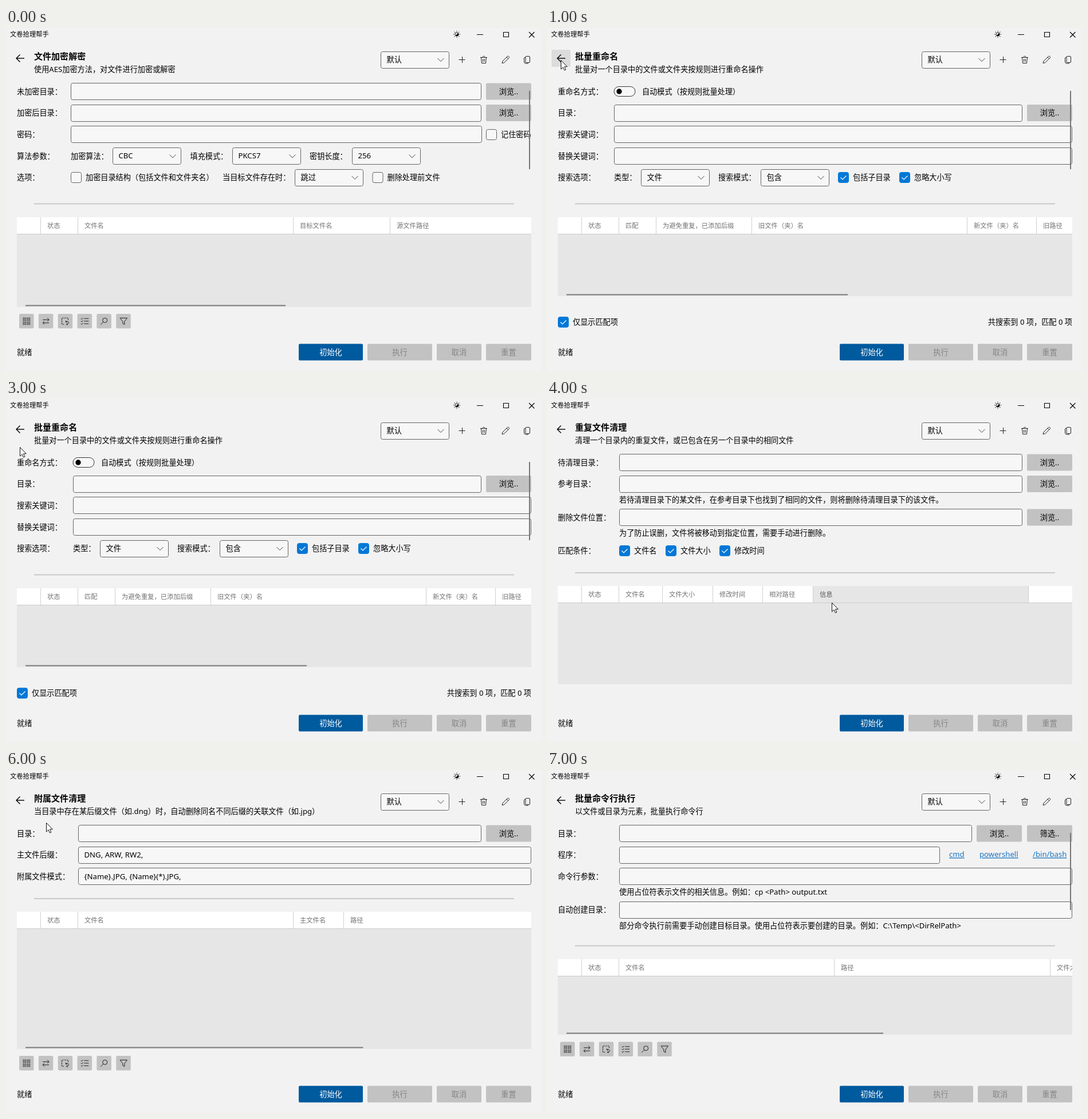
Animation, 934 px wide and 600 px high, one loop 8 s. Source, as an HTML page:

```html
<!DOCTYPE html>
<html lang="zh-CN">
<head>
<meta charset="utf-8">
<style>
html, body { margin: 0; width: 100%; height: 100%; overflow: hidden; background: #f2f2f2; }
svg { display: block; }
text { font-family: "Noto Sans", "Noto Sans CJK SC", "Noto Sans CJK", sans-serif; white-space: pre; }
</style>
</head>
<body>
<svg id="stage" width="934" height="600" viewBox="0 0 934 600"></svg>
<script>
const BODY = 13.16, SMALL = 11.3;
const ROW = [111, 148.5, 186, 224, 261.5];

// y is the vertical middle of the glyphs
const text = (x, y, s, o = {}) => {
  const { size = BODY, fill = '#000', anchor = 'start', extra = '' } = o;
  const safe = s.replace(/&/g, '&amp;').replace(/</g, '&lt;');
  return `<text x="${x}" y="${y + size * 0.36}" font-size="${size}" fill="${fill}" text-anchor="${anchor}" ${extra}>${safe}</text>`;
};
const rect = (x, y, w, h, fill, r = 0, stroke = 'none') =>
  `<rect x="${x}" y="${y}" width="${w}" height="${h}" rx="${r}" fill="${fill}" stroke="${stroke}"/>`;
const path = (d, w = 1, stroke = '#222', extra = '') =>
  `<path d="${d}" fill="none" stroke="${stroke}" stroke-width="${w}" ${extra}/>`;
const at = (x, y, s) => `<g transform="translate(${x} ${y})">${s}</g>`;

const label = (y, s) => text(19, y, s);
const frame = (x, y, w) => rect(x + .5, Math.round(y - 15) + .5, w - 1, 29, '#f7f7f7', 3, '#646464');
const field = (x, y, right, s = '') => frame(x, y, right - x) + text(x + 10.5, y, s);
const combo = (x, y, s) => frame(x, y, 120) + text(x + 10.5, y - .5, s) +
  path(`M${x + 99.5} ${y - 2.5}l5.5 5.5 5.5 -5.5`, 1, '#444');
const button = (x, y, w, s, fill = '#c2c2c2', ink = '#000', extra = '') =>
  rect(x, y - 14.5, w, 29, fill, 2) + text(x + w / 2, y, s, { fill: ink, anchor: 'middle', extra });
const browse = y => button(838, y, 79, '浏览..');
const check = (x, y, s, on) =>
  rect(x + .5, Math.round(y - 9.5) + .5, 18, 18, on ? '#0078d7' : '#f7f7f7', 3, on ? '#0078d7' : '#646464') +
  (on ? path(`M${x + 4.5} ${y}l3.5 3.5 6.5 -6.5`, 1.2, '#fff') : '') + text(x + 26, y, s);
const heading = (title, note) =>
  text(49, 50, title, { size: 15.04, extra: 'font-weight="700"' }) + text(49, 72.5, note);
const divider = y => rect(49, y, 838, 2, '#c9c9c9');
const scrollY = bottom => rect(913, 110, 2, bottom - 110, '#767676');
const scrollX = (y, right) => rect(34, y, right - 34, 2, '#7b7b7b');

// cols: [left edge, caption]; hot is the index of a hovered column
const table = (y, bottom, cols, hot = -1) => {
  let s = rect(19, y, 898, bottom - y, '#e6e6e6') + rect(19, y, 898, 29, '#fff');
  cols.forEach(([x, name], i) => {
    if (i === hot) s += rect(x, y, cols[i + 1][0] - x, 29, '#e6e6e6');
    if (x > 19) s += rect(x, y, 1, 29, '#cfcfcf');
    s += text(x + 12, y + 15, name, { size: SMALL, fill: i === hot ? '#555' : '#727272' });
  });
  return s + rect(19, y + 29, 898, 1, '#cbcbcb');
};

const cells = () => {
  let s = '';
  for (let i = 0; i < 16; i++) {
    const x = -6 + (i % 4) * 3.2 + (i % 4 > 1 ? .6 : 0), y = -6 + (i >> 2) * 3.2 + (i > 7 ? .6 : 0);
    s += rect(x, y, 2, 2, 'none', .4, '#222');
  }
  return `<g stroke-width=".7">${s}</g>`;
};
const glyphs = [
  cells(),
  path('M-5.5 -2.5H5.5M2.5 -5.5L5.5 -2.5 2.5 .5M5.5 3H-5.5M-2.5 0L-5.5 3 -2.5 6'),
  path('M5 -2V-5.5H-6V5.5H-1', 1.1, '#222', 'stroke-dasharray="2.4 1.4"') +
    path('M1 1.5C4 -1 7 1.5 5.5 4 4.5 5.5 3 5.5 2 5.5M4 3.5L2 5.5 4 7M1 -1V1.5H3.5'),
  path('M-1 -4.5H7M-1 0H7M-1 4.5H7M-6.5 -4.5l1.3 1.3 2.4 -2.6M-6.5 0l1.3 1.3 2.4 -2.6M-6.5 4.5l1.3 1.3 2.4 -2.6'),
  '<circle cx="1.5" cy="-1.5" r="4" fill="none" stroke="#222"/>' + path('M-1.5 1.5L-6 6'),
  path('M-6 -5.5H6.5L1.8 .5V6L-1.3 4V.5Z', 1, '#222', 'stroke-linejoin="round"')
];
const toolbar = y => glyphs.map((g, i) =>
  rect(23 + i * 33.85, y - 12.5, 25.5, 25.5, '#c2c2c2', 2) + at(35.8 + i * 33.85, y + .3, g)).join('');

const sun = () => {
  let s = '<circle r="3.2" fill="none" stroke="#111"/><path d="M2.3 -2.3A3.2 3.2 0 0 1 -2.3 2.3Z" fill="#111"/>';
  for (let a = 0; a < 360; a += 45) s += `<path d="M0 -6.2V-4.8" stroke="#111" transform="rotate(${a})"/>`;
  return s;
};
const off = ['#c2c2c2', '#858585'];
const chrome =
  text(7, 11, '文卷拾理帮手', { size: SMALL }) + at(787, 11, sun()) +
  path('M822 11.5H833M868.5 7.5H877.5V15.5H868.5ZM913 7L922.5 16.5M922.5 7L913 16.5', 1.1, '#000') +
  path('M32 53H18M24.5 46.5L18 53 24.5 59.5', 1.5, '#111') +
  combo(654, 55.5, '默认') +
  path('M790.5 55.5H801.5M796.5 50V61', 1, '#222') +
  path('M828 51.5H840M829.5 51.5L830.5 61.5H837.5L838.5 51.5M832 51.5C832 48.5 836 48.5 836 51.5M832.7 54V59M835.3 54V59', 1, '#222') +
  path('M866 61.5L867 58 875.5 49.5C877.5 48.5 879.5 50.5 878 52.5L869.5 60.8ZM874 51L876.7 53.7', 1, '#222') +
  path('M907.5 49.5H913Q914.5 49.5 914.5 51V59Q914.5 60.5 913 60.5H908.5Q907 60.5 907 59V50M907 51Q904.5 51 904.5 53V59Q904.5 62 908 62H912', 1, '#222') +
  label(567, '就绪') +
  button(511, 567, 112, '初始化', '#005a9e', '#fff', 'font-weight="500"') +
  button(631, 567, 113, '执行', ...off) + button(752, 567, 78, '取消', ...off) + button(838, 567, 79, '重置', ...off);

const crypt =
  heading('文件加密解密', '使用AES加密方法，对文件进行加密或解密') +
  label(ROW[0], '未加密目录：') + field(113, ROW[0], 830) + browse(ROW[0]) +
  label(ROW[1], '加密后目录：') + field(113, ROW[1], 830) + browse(ROW[1]) +
  label(ROW[2], '密码：') + field(113, ROW[2], 831) + check(838, ROW[2], '记住密码') +
  label(ROW[3], '算法参数：') + text(113, ROW[3], '加密算法：') + combo(186, ROW[3], 'CBC') +
  text(321.5, ROW[3], '填充模式：') + combo(395, ROW[3], 'PKCS7') +
  text(530, ROW[3], '密钥长度：') + combo(604, ROW[3], '256') +
  label(ROW[4], '选项：') + check(113, ROW[4], '加密目录结构（包括文件和文件夹名）') +
  text(378, ROW[4], '当目标文件存在时：') + combo(504, ROW[4], '跳过') + check(639.5, ROW[4], '删除处理前文件') +
  scrollY(247) + divider(306.5) +
  table(331, 488, [[60, '状态'], [125, '文件名'], [501, '目标文件名'], [670, '源文件路径']]) +
  scrollX(484.5, 488) + toolbar(512.5);

const clone =
  heading('目录结构克隆', '以一个目录为模板，导出一个新的稀疏文件目录，或包含文件结构的JSON文件') +
  label(ROW[0], '模板目录：') + field(152, ROW[0], 830) + browse(ROW[0]) +
  label(ROW[1], '稀疏文件目录导出：') + field(152, ROW[1], 830) + browse(ROW[1]) +
  text(152, 176, '生成一个新的目录，目录中文件与模板一致，但大小为0') +
  label(207, '结构文件导出：') + field(152, 207, 830) + browse(207) +
  text(152, 234.5, '导出为一个包含文件基本信息的JSON文件') + divider(265.5) +
  table(290, 507, [[19, '状态'], [83, '文件名'], [159, '文件大小'], [247, '修改时间'], [334, '信息'], [710, '']]);

const rename =
  heading('批量重命名', '批量对一个目录中的文件或文件夹按规则进行重命名操作') +
  label(ROW[0], '重命名方式：') + rect(117, 102.5, 37, 17, '#f7f7f7', 8.5, '#333') +
  '<circle cx="126" cy="111" r="4.7"/>' + text(166, ROW[0], '自动模式（按规则批量处理）') +
  label(ROW[1], '目录：') + field(117, ROW[1], 830) + browse(ROW[1]) +
  label(ROW[2], '搜索关键词：') + field(117, ROW[2], 917) +
  label(ROW[3], '替换关键词：') + field(117, ROW[3], 917) +
  label(ROW[4], '搜索选项：') + text(117, ROW[4], '类型：') + combo(164, ROW[4], '文件') +
  text(299, ROW[4], '搜索模式：') + combo(373, ROW[4], '包含') +
  check(508, ROW[4], '包括子目录', 1) + check(615, ROW[4], '忽略大小写', 1) +
  scrollY(247) + divider(306.5) +
  table(331, 469, [[60, '状态'], [125, '匹配'], [190, '为避免重复，已添加后缀'],
    [357, '旧文件（夹）名'], [733, '新文件（夹）名'], [854, '旧路径']]) +
  scrollX(465.5, 525) + check(19, 514.5, '仅显示匹配项', 1) +
  text(917, 514.5, '共搜索到 0 项，匹配 0 项', { anchor: 'end' });

const dedupe =
  heading('重复文件清理', '清理一个目录内的重复文件，或已包含在另一个目录中的相同文件') +
  label(ROW[0], '待清理目录：') + field(126, ROW[0], 830) + browse(ROW[0]) +
  label(ROW[1], '参考目录：') + field(126, ROW[1], 830) + browse(ROW[1]) +
  text(126, 176, '若待清理目录下的某文件，在参考目录下也找到了相同的文件，则将删除待清理目录下的该文件。') +
  label(207, '删除文件位置：') + field(126, 207, 830) + browse(207) +
  text(126, 234.5, '为了防止误删，文件将被移动到指定位置，需要手动进行删除。') +
  label(265.5, '匹配条件：') + check(126, 265.5, '文件名', 1) + check(207, 265.5, '文件大小', 1) +
  check(301, 265.5, '修改时间', 1) + divider(303) +
  table(327, 499, [[60, '状态'], [125, '文件名'], [201, '文件大小'], [289, '修改时间'],
    [376, '相对路径'], [464, '信息'], [840, '']], 5);

const attached =
  heading('附属文件清理', '当目录中存在某后缀文件（如.dng）时，自动删除同名不同后缀的关联文件（如.jpg）') +
  label(ROW[0], '目录：') + field(126, ROW[0], 830) + browse(ROW[0]) +
  label(ROW[1], '主文件后缀：') + field(126, ROW[1], 917, 'DNG, ARW, RW2,') +
  label(ROW[2], '附属文件模式：') + field(126, ROW[2], 917, '{Name}.JPG, {Name}(*).JPG,') + divider(224) +
  table(248, 488, [[60, '状态'], [125, '文件名'], [501, '主文件名'], [589, '路径']]);
const attachedFoot = scrollX(484.5, 623.5) + toolbar(512.5);

const link = (x, s) => text(x, 147.5, s, { fill: '#1a74c2', extra: 'text-decoration="underline"' });
const command =
  heading('批量命令行执行', '以文件或目录为元素，批量执行命令行') +
  label(ROW[0], '目录：') + field(126, ROW[0], 742) + button(750, ROW[0], 79, '浏览..') + button(838, ROW[0], 79, '筛选..') +
  label(ROW[1], '程序：') + field(126, ROW[1], 686) + link(702, 'cmd') + link(755, 'powershell') + link(848, '/bin/bash') +
  label(ROW[2], '命令行参数：') + field(126, ROW[2], 917) +
  text(126, 213.5, '使用占位符表示文件的相关信息。例如：cp <Path> output.txt') +
  label(244.5, '自动创建目录：') + field(126, 244.5, 917) +
  text(126, 272, '部分命令执行前需要手动创建目标目录。使用占位符表示要创建的目录。例如：C:\\Temp\\<DirRelPath>') +
  scrollY(245) + divider(306.5) +
  table(331, 463, [[60, '状态'], [125, '文件名'], [501, '路径'], [878, '文件大小']]) +
  scrollX(459.5, 587) + toolbar(488);

const pointer = (x, y) => at(x + .5, y + .5,
  '<path d="M0 0V15.5L3.6 12.2 6 17.5 8.4 16.5 6 11.2H10.8Z" fill="#fff" stroke="#111"/>');
const backHover = rect(8, 38, 33, 30, '#dcdcdc', 2);

// one scene per second: [under the window chrome, page, pointer]
const scenes = [
  ['', crypt, ''],
  [backHover, rename, pointer(24, 56)],
  ['', clone, pointer(101, 130)],
  ['', rename, pointer(24, 84)],
  ['', dedupe, pointer(497, 356)],
  ['', attached, ''],
  ['', attached + attachedFoot, pointer(70, 92)],
  ['', command, '']
];

const stage = document.getElementById('stage');
stage.innerHTML = '<clipPath id="page"><rect width="917" height="600"/></clipPath>' +
  rect(0, 0, 934, 600, '#f2f2f2') + scenes.map(([under, page, over]) =>
    `<g class="scene" display="none">${under}${chrome}<g clip-path="url(#page)">${page}</g>${over}</g>`).join('');
const groups = [...stage.querySelectorAll('.scene')];

const start = performance.now();
let shown = -1;
function draw(now) {
  const i = Math.floor(Math.max(0, now - start) % 8000 / 1000);
  if (i !== shown) {
    groups.forEach((g, k) => g.setAttribute('display', k === i ? 'inline' : 'none'));
    shown = i;
  }
  requestAnimationFrame(draw);
}
draw(start);
</script>
</body>
</html>
```
